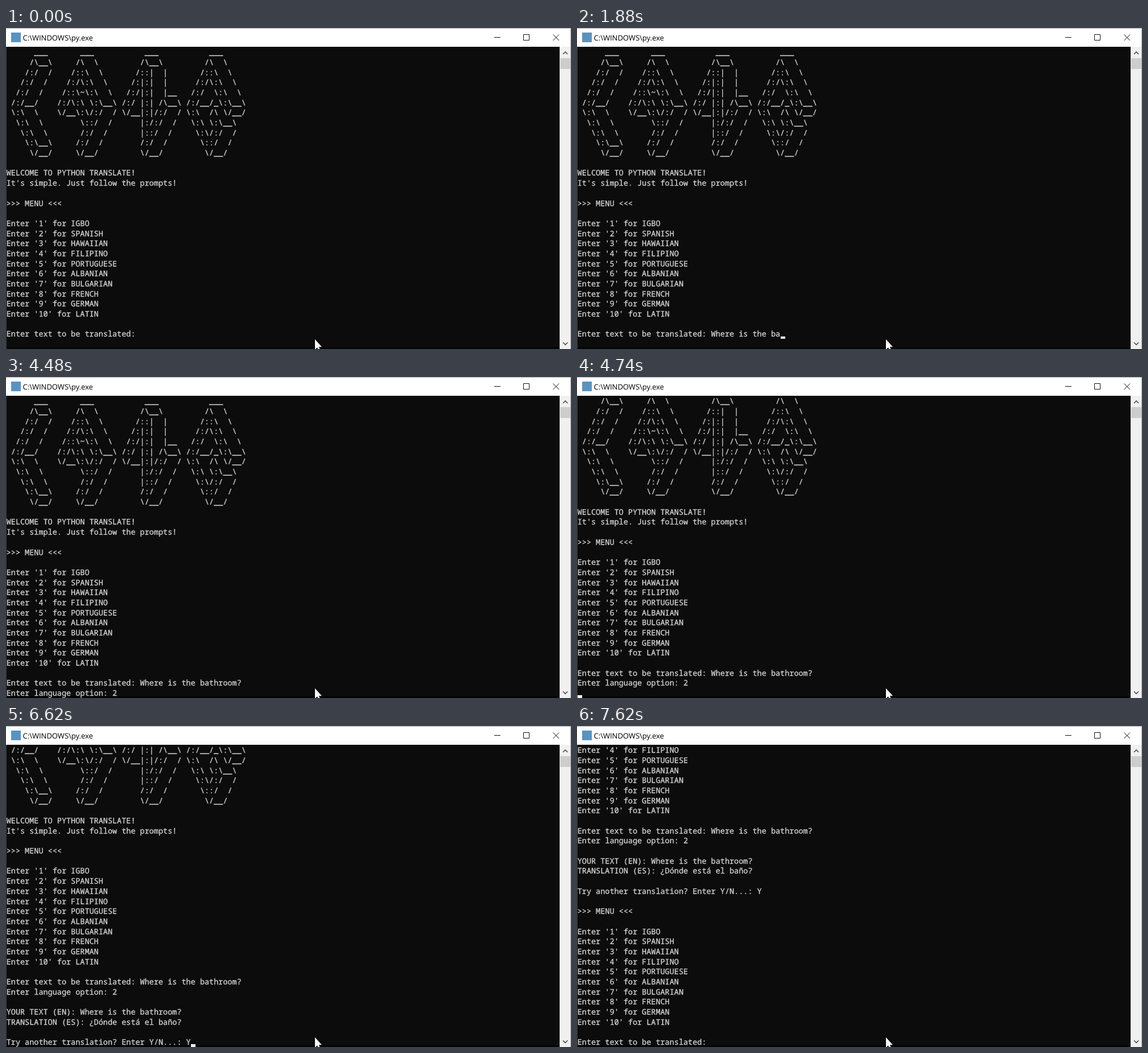
Write an HTML page that moves like this. It is 993 by 564 pixels and loops after 8 s.

```html
<!DOCTYPE html>
<html lang="en">
<head>
<meta charset="utf-8">
<title>Console translator</title>
<style>
  html, body { margin: 0; width: 100%; height: 100%; overflow: hidden; background: #fff; }
  #stage { position: relative; width: 993px; height: 564px; overflow: hidden; }
  #console { position: absolute; left: 0; top: 33px; width: 973px; height: 531px; overflow: hidden;
    background: linear-gradient(#0c0c0c 528px, #040404 528px); }
  #text { position: absolute; left: .7px; top: 1.2px; margin: 0; color: #d6d6d6; white-space: pre;
    font: 13.517px/17.69px "Noto Sans Mono", "DejaVu Sans Mono", monospace;
    -webkit-text-stroke: .3px #d6d6d6;
    font-variant-ligatures: none; text-rendering: geometricPrecision; }
  #cursor { position: absolute; width: 8px; height: 4.5px; background: #f2f2f2; }
  svg { position: absolute; left: 0; top: 0; }
  svg text { font: 13px "Open Sans", "Noto Sans", sans-serif; text-rendering: geometricPrecision; }
</style>
</head>
<body>
<div id="stage">
  <div id="console"><pre id="text"></pre><div id="cursor"></div></div>
  <svg width="993" height="564" fill="none">
    <rect x="9" y="8" width="17" height="17" fill="#5b93c0"/>
    <text x="29.500" y="22" fill="#000">C:\WINDOWS\py.exe</text>
    <path d="M858 16.5h11M909.5 11.5h10v10h-10zM961.5 11.5l10.5 10.5M972 11.5l-10.5 10.5" stroke="#111"/>
    <rect x="973" y="33" width="19" height="531" fill="#f0f0f0"/>
    <rect x="974" y="53" width="18" height="19" fill="#cdcdcd"/>
    <path d="M979 46l4-4 4 4M979 552.500l4 4 4-4" stroke="#505050" stroke-width="1.7"/>
    <path d="M0 .5H993M992.500 0V564" stroke="#a8a8a8"/>
    <path d="M.5 33V564" stroke="#3c3c3c"/>
    <path d="M543 547v18l4-3.700 2.500 5.700 2.800-1.200-2.500-5.500h5.200z" fill="#fff"/>
  </svg>
</div>
<script>
const LOOP = 8000, ROWS = 30, COL = 8.11, LINE = 17.69;

const banner = String.raw`      ___       ___           ___           ___
     /\__\     /\  \         /\__\         /\  \
    /:/  /    /::\  \       /::|  |       /::\  \
   /:/  /    /:/\:\  \     /:|:|  |      /:/\:\  \
  /:/  /    /::\~\:\  \   /:/|:|  |__   /:/  \:\  \
 /:/__/    /:/\:\ \:\__\ /:/ |:| /\__\ /:/__/_\:\__\
 \:\  \    \/__\:\/:/  / \/__|:|/:/  / \:\  /\ \/__/
  \:\  \        \::/  /      |:/:/  /   \:\ \:\__\
   \:\  \       /:/  /       |::/  /     \:\/:/  /
    \:\__\     /:/  /        /:/  /       \::/  /
     \/__/     \/__/         \/__/         \/__/`;

const languages = ["IGBO", "SPANISH", "HAWAIIAN", "FILIPINO", "PORTUGUESE",
  "ALBANIAN", "BULGARIAN", "FRENCH", "GERMAN", "LATIN"];
const menu = ">>> MENU <<<\n\n" +
  languages.map((name, i) => `Enter '${i + 1}' for ${name}\n`).join("") +
  "\nEnter text to be translated: ";

const phrase = "Where is the bathroom?";
const keyTimes = [330, 400, 530, 600, 730, 930, 1130, 1200, 1270, 1340, 1470,
  1550, 1630, 1740, 1880, 2030, 2140, 2260, 2380, 2490, 2690, 2890];

// Each step: time, text added to the console, cursor shown
const output = (time, text) => [time, text, true];
const blink = (time, on) => [time, "", on];
const steps = [
  [0, `${banner}\n\nWELCOME TO PYTHON TRANSLATE!\nIt's simple. Just follow the prompts!\n\n${menu}`, false],
  blink(270, true),
  ...keyTimes.map((time, i) => output(time, phrase[i])),
  blink(800, false), blink(1400, false), blink(2960, false),
  output(3350, "\nEnter language option: "),
  blink(3950, false),
  output(4410, "2"),
  blink(4480, false),
  output(4740, "\n"),
  output(4940, `\nYOUR TEXT (EN): ${phrase}\nTRANSLATION (ES): ¿Dónde está el baño?\n\nTry another translation? Enter Y/N...: `),
  blink(5530, false), blink(6060, true),
  output(6620, "Y"),
  blink(6690, false),
  output(6960, "\n"),
  output(7020, "\n" + menu),
  blink(7620, false)
].sort((a, b) => a[0] - b[0]);

const textBox = document.getElementById("text");
const cursor = document.getElementById("cursor");
let shown = 0;

function render(count) {
  const past = steps.slice(0, count);
  const lines = past.map(step => step[1]).join("").split("\n");
  const visible = lines.slice(-ROWS);
  textBox.textContent = visible.join("\n");
  cursor.style.left = 0.7 + visible.at(-1).length * COL + "px";
  cursor.style.top = visible.length * LINE - 4.4 + "px";
  cursor.hidden = !past.at(-1)[2];
}

function tick() {
  const time = performance.now() % LOOP;
  const count = steps.filter(step => step[0] <= time).length;
  if (count !== shown) render(shown = count);
  requestAnimationFrame(tick);
}
tick();
</script>
</body>
</html>
```
